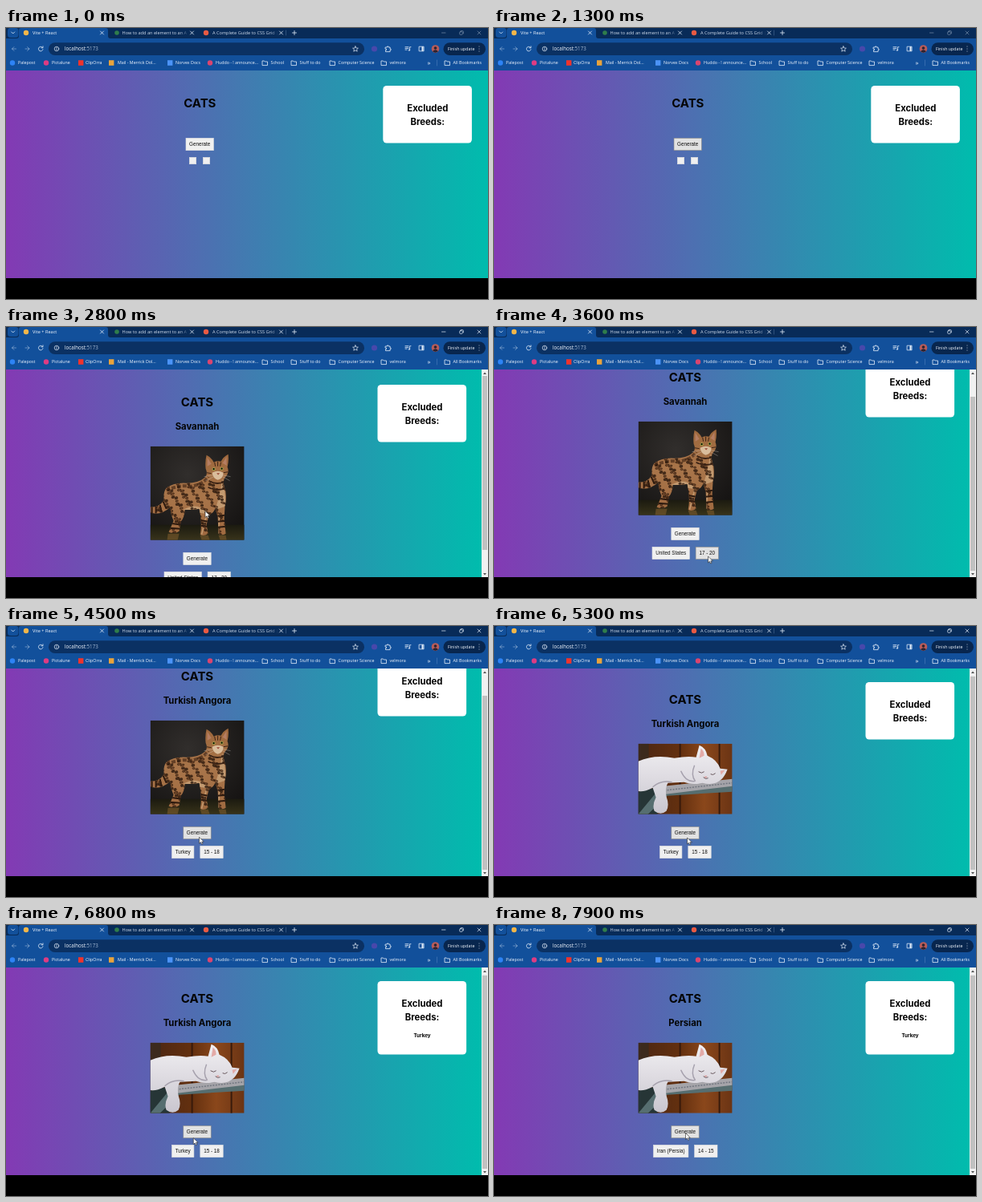
An HTML page for the animation above (8 s loop, 600 by 338 pixels).

```html
<!DOCTYPE html>
<html lang="en">
<head>
<meta charset="utf-8">
<title>Cats</title>
<style>
  html, body { margin: 0; width: 100%; height: 100%; overflow: hidden; background: #000; }
  svg { display: block; width: 100vw; height: 100vh; }
  .ui { font-family: "Open Sans", "Noto Sans", sans-serif; fill: #f4f8ff; }
  .page { font-family: Inter, sans-serif; font-weight: 700; text-anchor: middle; fill: #050505; }
  .button { font: 6.3px "Liberation Sans", Arial, sans-serif; text-anchor: middle; fill: #111; }
  .line { fill: none; stroke: #e3edf9; stroke-width: .8; stroke-linecap: round; stroke-linejoin: round; }
</style>
</head>
<body>
<svg viewBox="0 0 600 338">
  <defs>
    <linearGradient id="sky"><stop stop-color="#833ab4"/><stop offset="1" stop-color="#00bcad"/></linearGradient>
    <linearGradient id="wood">
      <stop stop-color="#4a2613"/><stop offset=".45" stop-color="#64300f"/>
      <stop offset=".7" stop-color="#8a471b"/><stop offset="1" stop-color="#6b3414"/>
    </linearGradient>
    <radialGradient id="studio" cx=".4" cy=".3" r=".8"><stop stop-color="#312e2c"/><stop offset="1" stop-color="#151312"/></radialGradient>
    <linearGradient id="floor" x2="0" y2="1"><stop stop-color="#1b1a10"/><stop offset="1" stop-color="#38331a"/></linearGradient>
    <linearGradient id="fur" x2="0" y2="1"><stop stop-color="#9d673c"/><stop offset=".5" stop-color="#a8754a"/><stop offset="1" stop-color="#a06a40"/></linearGradient>
    <linearGradient id="white" x2="0" y2="1"><stop stop-color="#f1eff2"/><stop offset="1" stop-color="#c9c6cf"/></linearGradient>
    <clipPath id="view"><rect y="53" width="600" height="259"/></clipPath>
    <clipPath id="square"><rect width="117" height="117"/></clipPath>
    <clipPath id="wide"><rect width="117" height="88"/></clipPath>
    <clipPath id="coat"><path id="coatShape" d="M20 52Q30 45 45 46Q60 46 68 39Q72 35 69 28Q68 19 70 11Q76 14 79 20Q83 18 88 19Q91 13 97 10Q98 18 96 26Q99 33 93 39Q90 43 92 50Q96 60 93 74L92 90L94 109Q89 112 85 109L84 88L81 78Q78 84 73 86L70 98L72 109Q66 113 62 110Q65 98 61 78Q50 80 43 79Q43 88 38 94L36 106Q30 110 23 107L29 93Q25 84 25 76Q16 84 7 84L0 83V76Q12 76 17 67Q16 57 20 52Z"/></clipPath>
  </defs>
  <rect width="600" height="338"/>

  <g clip-path="url(#view)">
    <rect id="backdrop" y="53" width="600" height="260" fill="url(#sky)"/>
    <g id="content">
      <rect id="panel" y="72" width="110.6" rx="4.5" fill="#fff"/>
      <g class="page">
        <g id="panelText" font-size="11.3">
          <text y="103.5">Excluded</text><text y="120.5">Breeds:</text>
          <text id="excluded" y="142" font-size="6.3">Turkey</text>
        </g>
        <text id="heading" y="98.9" font-size="15">CATS</text>
        <text id="breed" x="238" y="127.6" font-size="11.3"></text>
      </g>
      <g id="spotted" transform="translate(179.6 148.7)" clip-path="url(#square)">
        <rect width="117" height="117" fill="url(#studio)"/>
        <rect y="98" width="117" height="19" fill="url(#floor)"/>
        <path d="M22 109h14l-2 8h-13zM62 111h10l2 6h-10zM85 111h9l1 6h-8z" fill="#7c5a2c" opacity=".6"/>
        <use href="#coatShape" fill="url(#fur)"/>
        <g clip-path="url(#coat)">
          <path d="M43 79Q58 70 72 84L60 82ZM90 42Q88 60 82 78L94 74ZM86 85l-1 25M70 86l-6 24" fill="#c39a70" stroke="#c39a70" stroke-width="1.5"/>
          <path d="M20 55Q35 48 50 50Q66 48 72 38" fill="none" stroke="#54341f" stroke-width="4" stroke-dasharray="5 2" opacity=".8"/>
          <g id="spots" stroke="#2c190e"></g>
          <path d="M2 75v9M7 75v9M12 73l2 9M16 69l4 9M25 96l14 2M24 102l14 1M61 92l11 2M62 99l11 1M83 87l11-1M83 94l12-1M84 101l11-1" stroke="#2c190e" stroke-width="2"/>
          <path d="M73 43Q82 49 93 44M72 51Q83 57 95 52" fill="none" stroke="#3a2214" stroke-width="1.8"/>
          <path d="M80 20l1 5M84 19v6M88 20l-1 5M70 33l6 1M97 32l-6 1" stroke="#3a2214"/>
        </g>
        <path d="M77 33Q84 29 91 33Q91 40 84 42Q78 40 77 33Z" fill="#d9bd9c"/>
        <path d="M71 14l5 8-5 3zM95 13l-5 8 5 3z" fill="#b47d62"/>
        <circle cx="79" cy="28.5" r="2" fill="#a3aa4b"/><circle cx="89" cy="28" r="2" fill="#a3aa4b"/>
        <circle cx="79" cy="28.5" r="1.1"/><circle cx="89" cy="28" r="1.1"/>
        <path d="M82.5 33.5h4l-2 2.2z" fill="#9a4a38"/>
        <path d="M78 36l-11 2M79 38l-10 5M90 36l10 2M90 38l9 5" stroke="#d8d0c8" stroke-width=".35"/>
      </g>
      <g id="sleeper" transform="translate(179.6 148.7)" clip-path="url(#wide)">
        <rect width="117" height="88" fill="url(#wood)"/>
        <path d="M52 0V88M101 0V88" stroke="#381a0b" stroke-width="2"/>
        <path d="M0 0H13V88H0Z" fill="#3c2a1d"/>
        <path d="M0 60L24 54V88H0Z" fill="#263536"/>
        <path d="M0 88L24 59L117 52V60L36 65L12 88Z" fill="#566e70"/>
        <path d="M22 54L117 44V53L34 63Z" fill="#a5a4a9"/>
        <path d="M36 58L117 49" stroke="#727780" stroke-width="1.5" stroke-dasharray="2 1.5"/>
        <path d="M0 22Q20 13 45 18Q62 15 72 17L76 2Q84 5 86 15Q98 20 102 31L111 32Q108 40 104 44Q95 53 80 49Q68 52 57 48L37 49Q33 55 35 66Q39 77 35 84Q28 90 20 84Q17 77 22 67L18 55Q6 61 0 59Z" fill="url(#white)"/>
        <path d="M78 6Q82 9 82 15L76 18ZM102 34l6-1-5 6z" fill="#e3aaa7"/>
        <path d="M53 34Q59 48 70 47M70 27Q65 39 71 47M18 54Q28 45 42 48" fill="none" stroke="#a6a1ad" stroke-width="1.5"/>
        <path d="M75 35q4 3 7 0M90 38q3 2 6-1M81 42q3 3 6 1" fill="none" stroke="#66565b"/>
        <path d="M82 41l4 0-2 2z" fill="#d9918f"/>
      </g>
      <g id="buttons"></g>
    </g>
    <g id="scrollbar">
      <rect x="592" y="53" width="8" height="260" fill="#f1f1f1"/>
      <rect id="thumb" x="593" width="6" fill="#c1c1c1"/>
      <path d="M594 59l2-2.5 2 2.5zM594 307l2 2.5 2-2.5z" fill="#505050"/>
    </g>
  </g>

  <g class="ui">
    <rect width="600" height="14" fill="#082b58"/>
    <path d="M0 13H13Q16 13 16 10V3Q16 0 19 0H124Q127 0 127 3V10Q127 13 130 13H600V53H0Z" fill="#12509b"/>
    <rect x="2" y="0" width="13.5" height="12" rx="3.5" fill="#12509b"/>
    <rect x="53" y="18.3" width="393" height="15.8" rx="7.9" fill="#0b3163"/>
    <rect x="544.5" y="18.3" width="52.5" height="15.8" rx="7.9" fill="#08264e"/>
    <g class="line">
      <path d="M6.7 5l2 2 2-2M117.5 4l4 4m0-4l-4 4M229.5 4l4 4m0-4l-4 4M340.5 4l4 4m0-4l-4 4M356.5 6h5m-2.5-2.5v5"/>
      <path d="M348.5 3v6" stroke="#55769f" stroke-width=".5"/>
      <path d="M12.5 26H7.5m2.4-2.4L7.5 26l2.4 2.4M24 26h5m-2.4-2.4L29 26l-2.4 2.4" opacity=".5"/>
      <path d="M45.6 24.5a2.8 2.8 0 1 0 .4 2.2M46 22.8v2h-2"/>
      <circle cx="63" cy="26" r="2.8" stroke-width=".7"/><path d="M63 25.8v1.5M63 24.5v.1"/>
      <path d="M435 22.8l1 2.2 2.4.2-1.8 1.6.6 2.4-2.2-1.3-2.2 1.3.6-2.4-1.8-1.6 2.4-.2z" stroke-width=".7"/>
      <path d="M472.5 24h2v-1h1.6v1h2v2h1v1.6h-1v2h-5.6v-2h1V26h-1z"/>
      <path d="M497 23.7h4M497 25.4h4M497 27.1h2M502.6 27.5v-3.8h1.4"/><circle cx="501.9" cy="27.7" r=".7"/>
      <rect x="514.5" y="23.2" width="5.6" height="5.6"/><path d="M518.5 24v4" stroke-width="2"/>
      <path d="M536.5 40v7" stroke="#5b89c0" stroke-width=".5"/>
      <g id="windowControls" stroke-width=".7">
        <path d="M542.5 6h4.5M587 4l4 4m0-4l-4 4M566.2 3.6h2.2q1 0 1 1v2.2"/>
        <rect x="564.7" y="4.7" width="3.6" height="3.6" rx=".8"/>
      </g>
    </g>
    <circle cx="458.5" cy="26" r="3.6" fill="#4848ab"/>
    <circle cx="534.5" cy="26" r="4.8" fill="#b85b59"/>
    <path d="M531 29.3Q534.5 25 538 29.3Q534.5 32 531 29.3" fill="#2a2330"/><circle cx="534.5" cy="25" r="1.8" fill="#2a2330"/>
    <path d="M589 23v.1M589 26v.1M589 29v.1" class="line" stroke-width="1.4"/>
    <g id="chrome"></g>
  </g>
  <path id="cursor" d="M0 0V8L1.9 6.3L3.2 9L4.5 8.4L3.3 5.8H5.8Z" fill="#fff" stroke="#222" stroke-width=".6"/>
</svg>
<script>
const NS = 'http://www.w3.org/2000/svg';
const $ = id => document.getElementById(id);
function add(parent, tag, attrs, text = '') {
  const node = document.createElementNS(NS, tag);
  set(node, attrs);
  node.textContent = text;
  parent.append(node);
  return node;
}
function set(node, attrs) {
  for (const key in attrs) node.setAttribute(key, attrs[key]);
}
const show = (id, on) => set($(id), { visibility: on ? 'visible' : 'hidden' });

// Browser labels
const chrome = $('chrome');
const label = (x, y, text, size = 5.3, fill = '#f4f8ff') =>
  add(chrome, 'text', { x, y, 'font-size': size, fill }, text);
const dot = (cx, cy, fill, r = 3.2) => add(chrome, 'circle', { cx, cy, r, fill });
const box = (x, y, fill) => add(chrome, 'rect', { x: x - 3, y: y - 3.3, width: 6.4, height: 6.6, fill });

function fadingLabel(x, end, text) {
  const id = 'fade' + x;
  const fade = add(chrome, 'linearGradient', { id, gradientUnits: 'userSpaceOnUse', x1: end - 10, x2: end });
  add(fade, 'stop', { 'stop-color': '#d0dcec' });
  add(fade, 'stop', { offset: 1, 'stop-color': '#d0dcec', 'stop-opacity': 0 });
  label(x, 8.1, text, 5.6, `url(#${id})`);
}
dot(25, 6, '#f3b64a');
label(33, 8.1, 'Vite + React', 5.6);
dot(138, 6, '#2f7d4b', 2.8);
fadingLabel(144.5, 227, 'How to add an element to an A');
dot(249, 6, '#e85a43');
fadingLabel(257, 339, 'A Complete Guide to CSS Grid |');
label(73, 28.3, 'localhost', 6.2).append(add(chrome, 'tspan', { fill: '#a3b8d4' }, ':5173'));
label(550, 28, 'Finish update');

const bookmarks = [
  [dot, 8, 15, 'Palepost', '#2d83f5'], [dot, 50, 57, 'Pictalune', '#dd3c83'],
  [box, 93, 99, 'ClipOrra', '#f0332c'], [box, 131, 139, 'Mail - Merrick Dol...', '#e9a33b'],
  [box, 204, 211, 'Norvex Docs', '#4b93f7'], [dot, 254, 261, 'Huddo - ! announce...', '#d9456f']
];
for (const [icon, x, textX, text, fill] of bookmarks) {
  icon(x, 43.5, fill);
  label(textX, 45.4, text);
}
const folders = [[322, 'School'], [358, 'Stuff to do'], [406, 'Computer Science'], [470, 'velmora'], [549, 'All Bookmarks']];
for (const [x, text] of folders) {
  add(chrome, 'path', { d: `M${x - 3} 46.2V41h2.4l.9 1h3.2v4.2z`, class: 'line' });
  label(x + 7.6, 45.4, text);
}
label(524.5, 45.8, '»', 8);

// Rosettes and solid spots scattered over the coat
for (let i = 0; i < 170; i++) {
  const x = (i * 61.8034) % 100, y = 44 + (i * 7.13) % 66;
  add($('spots'), 'ellipse', {
    cx: x, cy: y, rx: 1.5 + (i % 3) * .4, ry: 1 + (i % 2) * .4,
    transform: `rotate(${i * 37 % 60 - 30} ${x} ${y})`, fill: i % 2 ? '#2c190e' : '#7d4b29', opacity: .8
  });
}

// Page buttons, with the border kept inside the given size
const BORDER = .6;
const buttons = [0, 1, 2].map(() => ({
  rect: add($('buttons'), 'rect', { 'stroke-width': BORDER }),
  text: add($('buttons'), 'text', { class: 'button' })
}));
function placeButton({ rect, text }, caption, cx, cy, width, height, hovered) {
  set(rect, {
    x: cx - (width - BORDER) / 2, y: cy - (height - BORDER) / 2,
    width: width - BORDER, height: height - BORDER,
    fill: hovered ? '#e2e2e2' : '#f0f0f0', stroke: hovered ? '#858585' : '#e0e0e0'
  });
  set(text, { x: cx, y: cy + 2.2 });
  text.textContent = caption;
}

// start time, breed, then caption / centre / width for both buttons
const cats = [
  [0, '', '', 232.5, 9, '', 249.5, 9],
  [2300, 'Savannah', 'United States', 220.2, 47, '17 - 20', 265.3, 29],
  [4400, 'Turkish Angora', 'Turkey', 220.2, 28, '15 - 18', 256, 29],
  [7500, 'Persian', 'Iran (Persia)', 220.2, 44, '14 - 15', 263.8, 29]
];
const FOCUS = 1900, LOADED = 2300, SWAPPED = 4600, EXCLUDED = 6200;

// time, x, y of the pointer tip
const pointer = [
  [0, 300, 330], [650, 300, 330], [900, 241, 146], [2350, 241, 146], [2800, 248, 229.5],
  [3100, 250, 240], [3600, 266.5, 286], [3800, 266.5, 286], [4150, 240.5, 263],
  [5300, 240.5, 264], [5450, 240.5, 264], [5900, 223.5, 277], [6500, 223.5, 277],
  [7000, 238.5, 259.5], [8000, 238.5, 259.5]
];
const ease = u => u * u * (3 - 2 * u);
const ramp = (t, from, to) => ease(Math.min(1, Math.max(0, (t - from) / (to - from))));
function pointerAt(t) {
  const i = pointer.findIndex(p => p[0] > t);
  const [t0, x0, y0] = pointer[i - 1], [t1, x1, y1] = pointer[i];
  const u = ramp(t, t0, t1);
  return [x0 + (x1 - x0) * u, y0 + (y1 - y0) * u];
}

function render(t) {
  const loaded = t >= LOADED, swapped = t >= SWAPPED;
  const [, breed, left, leftX, leftW, right, rightX, rightW] = cats.findLast(c => t >= c[0]);
  const maxScroll = swapped ? 2 : 31;
  const scroll = loaded ? Math.min(maxScroll, 31 * ramp(t, 2900, 3150)) : 0;
  const [px, py] = pointerAt(t);

  set($('backdrop'), { width: loaded ? 592 : 600 });
  set($('content'), { transform: `translate(0 ${-scroll})` });
  set($('heading'), { x: loaded ? 238 : 241.3 });
  $('breed').textContent = breed;
  const panelX = loaded ? 462.5 : 469.3;
  set($('panel'), { x: panelX, height: t >= EXCLUDED ? 91.5 : 71.5 });
  set($('panelText'), { transform: `translate(${panelX + 55.5} 0)` });
  show('excluded', t >= EXCLUDED);
  show('spotted', loaded && !swapped);
  show('sleeper', swapped);

  const rowY = loaded ? 172 + (swapped ? 88 : 117) : 145;
  const rows = [
    ['Generate', loaded ? 238 : 241.2, rowY, 35, 16],
    [left, leftX, rowY + (loaded ? 24 : 20.5), leftW, loaded ? 16 : 9],
    [right, rightX, rowY + (loaded ? 24 : 20.5), rightW, loaded ? 16 : 9]
  ];
  rows.forEach(([caption, cx, cy, w, h], i) => {
    const hovered = Math.abs(px - cx) < w / 2 && Math.abs(py + scroll - cy) < h / 2;
    placeButton(buttons[i], caption, cx, cy, w, h, hovered);
  });

  show('scrollbar', loaded);
  const thumbHeight = 243 * 259 / (259 + maxScroll);
  set($('thumb'), { y: 61 + (243 - thumbHeight) * scroll / maxScroll, height: thumbHeight });
  set($('windowControls'), { opacity: t >= FOCUS ? 1 : .5 });
  show('cursor', t >= FOCUS);
  set($('cursor'), { transform: `translate(${px} ${py})` });
}

const start = performance.now();
function tick() {
  render((performance.now() - start) % 8000);
  requestAnimationFrame(tick);
}
tick();
</script>
</body>
</html>
```
